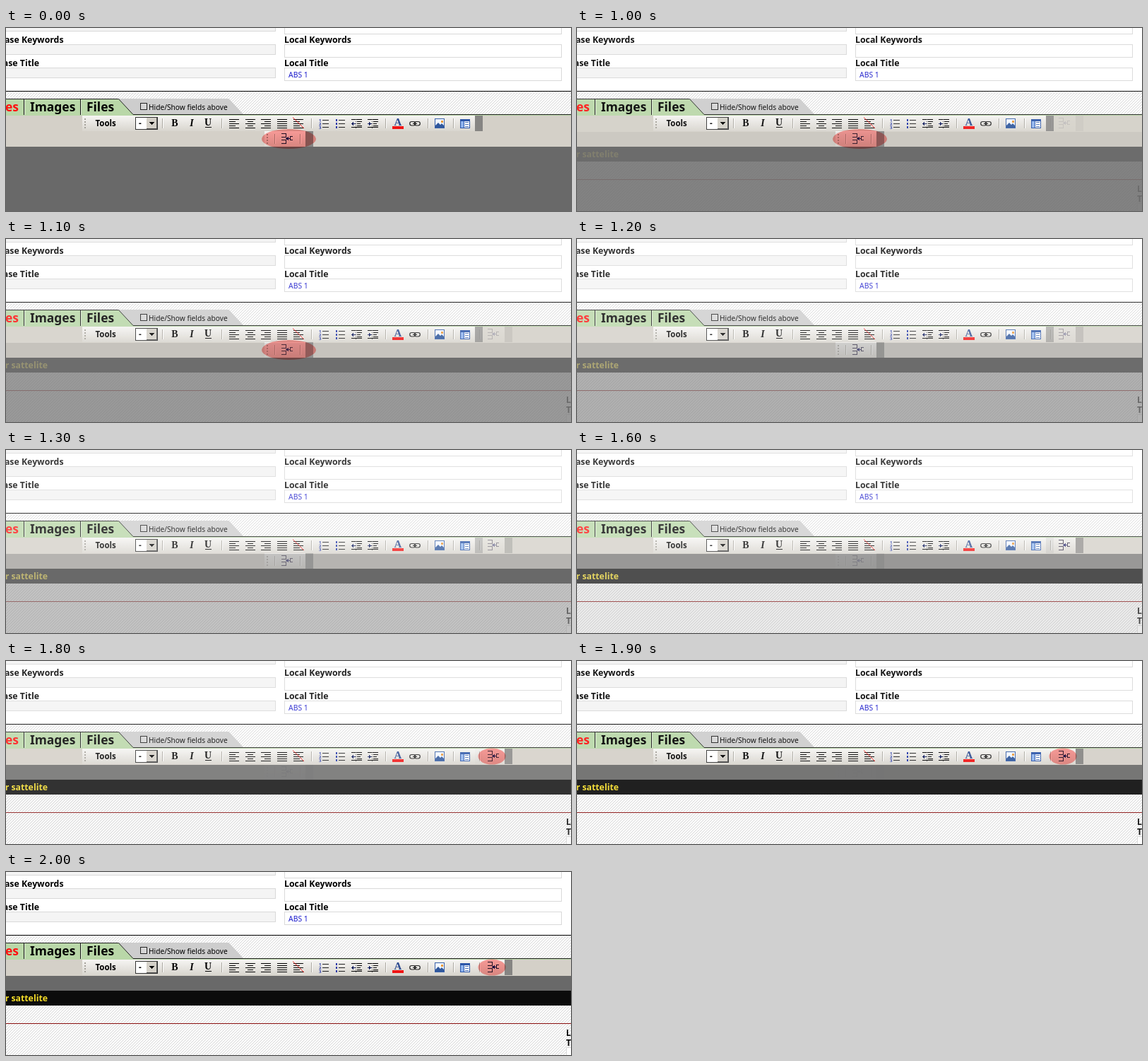
Write an HTML page that moves like this. It is 800x259 px and loops after 7 s.

```html
<!DOCTYPE html>
<html lang="en">
<head>
<meta charset="utf-8">
<title>Toolbar docking</title>
<style>
  html, body { margin: 0; width: 100%; height: 100%; overflow: hidden; background: #fff; }
  svg { display: block; width: 800px; height: 259px; shape-rendering: crispEdges; }
  text { font-family: "Noto Sans", "Open Sans", sans-serif; white-space: pre; }
  .label { font-size: 12.3px; font-weight: 700; }
  .tab { font-size: 17.4px; font-weight: 700; }
  .small { font-size: 10.2px; }
  .field { font-size: 10.4px; }
  .tool { font-size: 11.5px; font-weight: 700; }
  .serif { font-family: "Liberation Serif", serif; font-size: 14px; font-weight: 700; }
  .end { text-anchor: end; }
  .mid { text-anchor: middle; }
  .smooth { shape-rendering: auto; }
  .mark { shape-rendering: auto; fill: #ffa09e; mix-blend-mode: multiply; }
</style>
</head>
<body>
<svg id="stage" viewBox="0 0 800 259">
  <defs>
    <pattern id="hatch" width="4" height="4" patternUnits="userSpaceOnUse">
      <rect width="4" height="4" fill="#fff"/>
      <path d="M3 0h1v1h-1zM2 1h1v1h-1zM1 2h1v1h-1zM0 3h1v1h-1z" fill="#d4d4d4"/>
    </pattern>
    <linearGradient id="strip" x2="0" y2="1">
      <stop stop-color="#f6f5f3"/><stop offset="1" stop-color="#d8d5ce"/>
    </linearGradient>
    <g id="page"></g>
  </defs>
  <rect width="800" height="259" fill="#fff"/>
  <g id="before"></g>
  <g id="after"></g>
  <ellipse id="markBefore" class="mark" cx="400.5" cy="157" rx="38.5" ry="14"/>
  <ellipse id="markAfter" class="mark" cx="688" cy="135" rx="19.5" ry="11.5"/>
</svg>
<script>
const $ = id => document.getElementById(id);
const rect = (x, y, w, h, fill) => `<rect x="${x}" y="${y}" width="${w}" height="${h}" fill="${fill}"/>`;
const text = (x, y, cls, str, fill = '#000', extra = '') =>
  `<text x="${x}" y="${y}" class="${cls}" fill="${fill}" ${extra}>${str}</text>`;
const path = (d, stroke = '#000', fill = 'none', cls = '') =>
  `<path d="${d}" stroke="${stroke}" fill="${fill}" class="${cls}"/>`;
const list = (n, fn) => Array.from({ length: n }, (_, i) => fn(i)).join('');

const field = (x, y, w, h, fill) => rect(x, y, w, h, '#d9d9d9') + rect(x + 1, y + 1, w - 2, h - 2, fill);
const separator = (x, y) => rect(x, y, 1, 14, '#aaa79f') + rect(x + 1, y, 1, 14, '#fff');
const handle = (x, y) => list(4, i => rect(x, y + i * 4, 2, 2, '#a5a29b'));
const strip = (x, y, w) => rect(x, y, w, 22, 'url(#strip)') + rect(x + w, y, 11, 22, '#868583');

// Five text lines; the short ones are shifted by `indent`.
const align = (x, short, indent) =>
  list(5, i => i % 2 ? rect(x + indent, 129 + i * 3, short, 1, '#000') : rect(x, 129 + i * 3, 14, 1, '#000'));

const listIcon = (x, marker) =>
  list(3, i => marker(i, 130 + i * 5) + rect(x, 130 + i * 5, 9, 1, '#222'));

const indentIcon = (x, dir) => {
  const tip = dir < 0 ? x : x + 5;
  return rect(x, 129, 15, 1, '#000') + rect(x, 140, 15, 1, '#000') +
    list(3, i => rect(x + 8, 132 + i * 3, i % 2 ? 5 : 7, 1, '#000')) +
    path(`M${tip} 135.5l${-dir * 3} -3v6z`, 'none', '#142060') + rect(x, 135, 6, 1, '#142060') +
    list(5, i => rect(x + 6, 129 + i * 3, 1, 1, '#555'));
};

const splitIcon = (x, y) =>
  path(`M${x} ${y + .5}h6.5v5h-6.5M${x} ${y + 9.5}h6.5v5h-6.5`, '#201838') +
  path(`M${x + 16} ${y + 4.5}h-3.5v5h3.5`, '#201838') +
  rect(x + 7, y + 7, 5, 1, '#101060') +
  path(`M${x + 6} ${y + 7.5}l4 -3v6z`, 'none', '#101060');

function form() {
  return rect(0, 0, 800, 259, '#fff') +
    field(-5, -12, 387, 17, '#f4f4f4') + field(394, -12, 393, 21, '#fff') +
    field(-5, 23, 387, 15, '#f4f4f4') + field(394, 23, 393, 19, '#fff') +
    field(-5, 56, 387, 15, '#f4f4f4') + field(394, 56, 393, 19, '#fff') +
    text(81.5, 21, 'label end', 'Base Keywords') + text(394, 21, 'label', 'Local Keywords') +
    text(47, 54, 'label end', 'Base Title') + text(394, 54, 'label', 'Local Title') +
    text(400, 70, 'field', 'ABS 1', '#1a1acc');
}

function tabs() {
  return rect(0, 90, 800, 34, 'url(#hatch)') + rect(0, 89, 800, 1, '#000') +
    path('M159 100H315.5L336 122H179z', 'none', '#cdcdcd', 'smooth') +
    path('M-1 101H160L180 122V124H-1z', 'none', '#b9d7a8') +
    path('M0 100.5H159.5L180 122.5H800', '#222', 'none', 'smooth') +
    rect(0, 123, 800, 1, '#b9d7a8') +
    rect(25, 101, 1, 22, '#111') + rect(105, 101, 1, 22, '#111') +
    rect(26, 101, 1, 22, '#e0f0d8') + rect(106, 101, 1, 22, '#e0f0d8') +
    text(18, 118, 'tab end', 'es', '#f11') + text(34, 118, 'tab', 'Images') + text(114, 118, 'tab', 'Files') +
    path('M190.5 106.5h9v9h-9z', '#222', '#d6d6d6') +
    text(202, 116, 'small', 'Hide/Show fields above');
}

function tools() {
  const picker = rect(183, 126, 32, 18, '#333') + rect(184, 127, 30, 16, '#fff') +
    rect(199, 127, 15, 16, '#555') + rect(199, 127, 14, 15, '#d4d0c8') +
    path('M202 133h8l-4 4z', 'none', '#000') + text(188, 139, 'tool', '-');
  const digits = listIcon(448, (i, y) => text(443, y + 3, 'small', i + 1, '#2438a8', 'style="font-size:6px;font-weight:700"'));
  const bullets = listIcon(471, (i, y) => rect(467, y - 1, 2, 3, '#2438a8'));
  const link = '<g class="smooth" fill="none" stroke="#222" stroke-width="1.2">' +
    '<rect x="571.7" y="132.5" width="8" height="5.5" rx="2.7"/><rect x="578.3" y="132.5" width="8" height="5.5" rx="2.7"/>' +
    '<path d="M576 135.3h6"/></g>';
  const picture = rect(607, 128, 14, 14, '#3b62a8') + rect(608, 129, 12, 12, '#f2f7ff') +
    path('M608 141v-3l4 -4 3 3 2 -2 3 3v3z', 'none', '#2f579c', 'smooth') + rect(616, 131, 3, 3, '#e99a3c');
  const panel = rect(643, 129, 14, 13, '#2c56a8') + rect(644, 132, 4, 9, '#8fb4ee') + rect(649, 132, 7, 9, '#fff') +
    list(3, i => rect(650, 133 + i * 3, 5, 1, '#4f74b8'));
  return handle(111, 128) + text(126.5, 139, 'tool', 'Tools') +
    [183, 221, 305, 432, 537, 597, 633].map(x => separator(x, 128)).join('') + picker +
    text(239, 139, 'serif mid', 'B') + text(263, 139, 'serif mid', 'I', '#000', 'font-style="italic"') +
    text(286, 138, 'serif mid', 'U') + rect(282, 140, 9, 1, '#000') +
    align(316, 9, 0) + align(339, 8, 3) + align(361, 9, 5) + align(384, 14, 0) + align(407, 9, 0) +
    path('M406 126.5L422 142', '#e22', 'none', 'smooth') +
    digits + bullets + indentIcon(489, -1) + indentIcon(512, 1) +
    text(555, 138, 'serif mid', 'A', '#2c4a90', 'style="font-size:15px"') + rect(547, 139, 16, 4, '#f01414') +
    link + picture + panel;
}

$('page').innerHTML = form() + tabs() + rect(0, 124, 800, 23, '#d4d0c8');

$('before').innerHTML = '<use href="#page"/>' + rect(0, 147, 800, 21, '#d4d0c8') + rect(0, 168, 800, 91, '#696969') +
  strip(108, 124, 556) + tools() +
  strip(366, 146, 58) + handle(369, 150) + separator(380, 150) + splitIcon(390, 149) + separator(416, 150);

$('after').innerHTML = '<use href="#page"/>' + rect(0, 147, 800, 21, '#696969') +
  strip(108, 124, 598) + tools() + separator(670, 128) + splitIcon(682, 127) +
  rect(0, 168, 800, 21, '#0c0c0c') + text(59, 183, 'label end', 'r sattelite', '#f4dc28') +
  rect(0, 189, 800, 70, 'url(#hatch)') + rect(0, 214, 800, 1, '#8a1010') +
  text(793, 232, 'label', 'Local') + text(793, 246, 'label', 'Title') + field(793, 248, 40, 20, '#fff');

const LOOP = 7000, FADE_START = 1000, STEP = 100, STEPS = 11;

function draw(time) {
  const t = time % LOOP;
  const step = t < FADE_START ? 0 : Math.min(STEPS, Math.floor((t - FADE_START) / STEP) + 1);
  const p = step / STEPS;
  // Both pictures fade over white, so the middle of the change looks washed out.
  $('before').setAttribute('opacity', 1 - p);
  $('after').setAttribute('opacity', p);
  $('markBefore').setAttribute('visibility', step < 3 ? 'visible' : 'hidden');
  $('markAfter').setAttribute('visibility', step > 8 ? 'visible' : 'hidden');
}

const start = performance.now();
function tick() {
  draw(performance.now() - start);
  requestAnimationFrame(tick);
}
tick();
</script>
</body>
</html>
```
